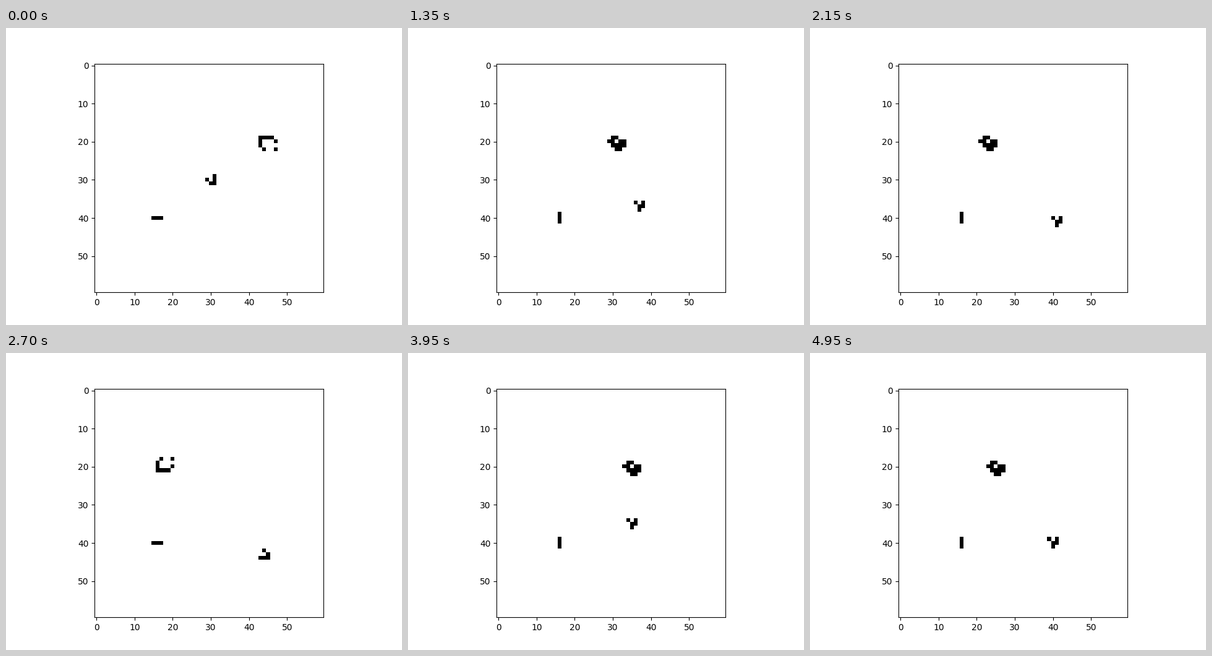
A matplotlib script that plays this animation: 640x480 px, repeating every 5000 ms.

```python
import numpy as np
import matplotlib.pyplot as plt
from matplotlib.animation import FuncAnimation

SIZE = 60
GENERATIONS = 60   # the world restarts after this many steps
LEAD_IN = 2        # generations already passed when the loop begins
FRAMES = 100
INTERVAL = 50

GLIDER = [".O.",
          "..O",
          "OOO"]
BLINKER = ["OOO"]
SPACESHIP = [".O..O",
             "O....",
             "O...O",
             "OOOO."]


def place(grid, pattern, row, col):
    cells = np.array([[c == "O" for c in line] for line in pattern], dtype=int)
    h, w = cells.shape
    grid[row:row + h, col:col + w] = cells


def step(grid):
    """Advance Conway's Game of Life by one generation on a torus."""
    near = sum(np.roll(grid, (dy, dx), axis=(0, 1))
               for dy in (-1, 0, 1) for dx in (-1, 0, 1) if dy or dx)
    return ((near == 3) | ((grid == 1) & (near == 2))).astype(int)


def evolve():
    grid = np.zeros((SIZE, SIZE), dtype=int)
    place(grid, GLIDER, 28, 29)
    place(grid, BLINKER, 40, 15)
    place(grid, SPACESHIP, 18, 44)
    history = [grid]
    while len(history) < GENERATIONS:
        history.append(step(history[-1]))
    return history


history = evolve()

fig, ax = plt.subplots(figsize=(6.4, 4.8), dpi=100)
image = ax.imshow(history[LEAD_IN], cmap="binary", vmin=0, vmax=1,
                  interpolation="nearest")


def update(frame):
    image.set_data(history[(frame + LEAD_IN) % GENERATIONS])
    return [image]


anim = FuncAnimation(fig, update, frames=FRAMES, interval=INTERVAL,
                     repeat=True, repeat_delay=0)
plt.show()
```
